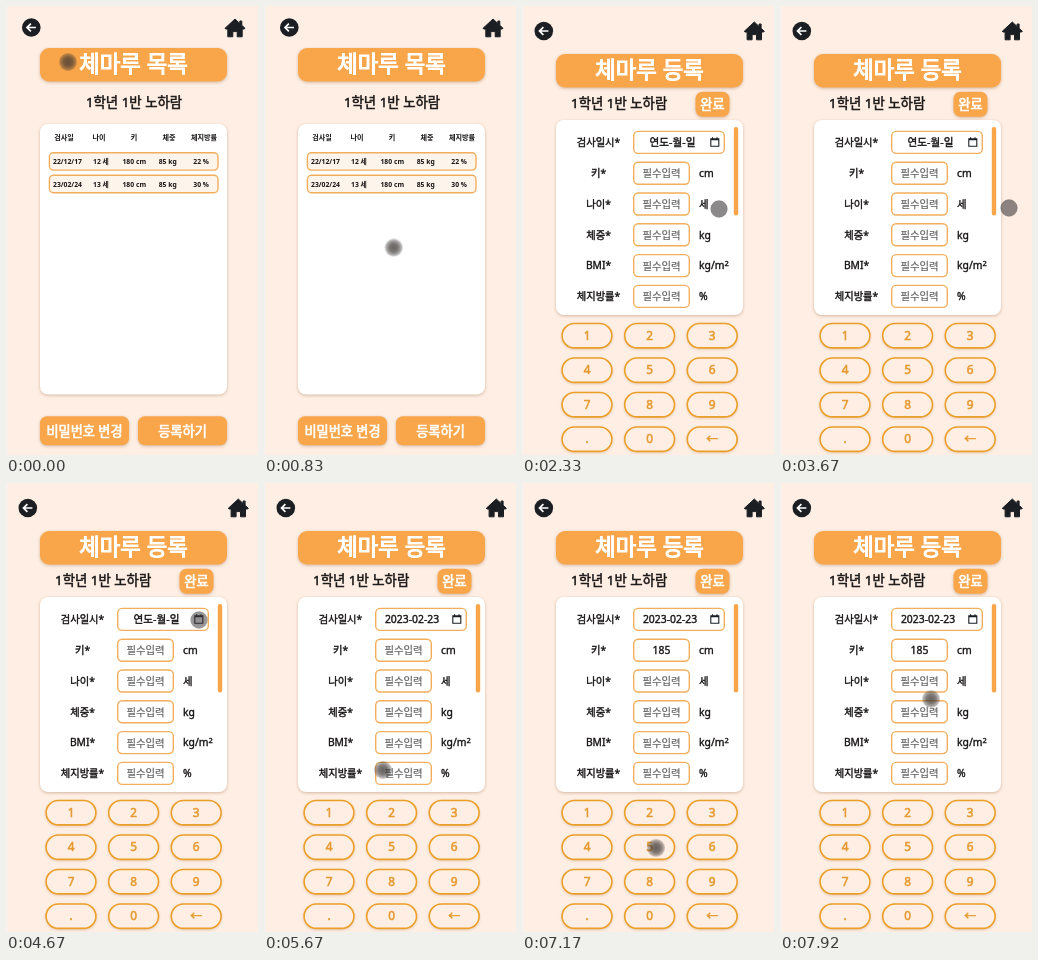
Animation, 252 px wide and 449 px high, one loop 8 s. Source, as an HTML page:

```html
<!DOCTYPE html>
<html lang="ko">
<head>
<meta charset="utf-8">
<title>체마루</title>
<style>
html, body { margin: 0; width: 100%; height: 100%; overflow: hidden; background: #feeee3; }
svg { display: block; width: 100%; height: 100%; }
/* a fine outline gives the regular weight a medium look */
text {
  font-family: "Noto Sans", "Noto Sans CJK KR", "Noto Sans CJK", sans-serif; font-weight: 400;
  color: #171414; fill: currentColor; stroke: currentColor; stroke-width: .035em; text-anchor: middle;
}
.start { text-anchor: start; }
.bold { font-weight: 700; stroke: none; }
.white { color: #fff; stroke-width: .05em; }
.hint { color: #666; stroke-width: .02em; }
.key { color: #e59a30; stroke-width: .05em; }
.panel { fill: #f9a64b; }
.card { fill: #fff; }
.raised { filter: drop-shadow(0 1.5px 1.5px #8c5a3060); }
.outline { fill: #fff; stroke: #f2ae5c; stroke-width: 1.4; }
.entry { fill: #fdf4ec; }
.pill { fill: #feeee3; stroke: #eb9f28; stroke-width: 1.6; filter: drop-shadow(0 1px 1px #8c5a3038); }

/* every state shares one 8 s clock */
.state { animation: 8s step-end infinite; }
.list { animation-name: list; }
.form { animation-name: form; }
.no-date { animation-name: no-date; }
.date { animation-name: date; }
.empty { animation-name: empty; }
.one { animation-name: one; }
.two { animation-name: two; }
.three { animation-name: three; }
@keyframes list { 0% { opacity: 1 } 24%, 100% { opacity: 0 } }
@keyframes form { 0% { opacity: 0 } 24%, 100% { opacity: 1 } }
@keyframes no-date { 0% { opacity: 1 } 62%, 100% { opacity: 0 } }
@keyframes date { 0% { opacity: 0 } 62%, 100% { opacity: 1 } }
@keyframes empty { 0% { opacity: 1 } 75%, 100% { opacity: 0 } }
@keyframes one { 0% { opacity: 0 } 75% { opacity: 1 } 81.5%, 100% { opacity: 0 } }
@keyframes two { 0% { opacity: 0 } 81.5% { opacity: 1 } 89%, 100% { opacity: 0 } }
@keyframes three { 0% { opacity: 0 } 89%, 100% { opacity: 1 } }

.pointer { animation: move 8s ease-in-out infinite; }
.flat { animation: flat 8s linear infinite; }
.press { animation: press 8s linear infinite; }
@keyframes move {
  0%, 3% { transform: translate(62px, 56px) }
  18%, 23% { transform: translate(201px, 437px) }
  29%, 32% { transform: translate(197px, 203px) }
  40%, 47% { transform: translate(229px, 202px) }
  53%, 60% { transform: translate(193px, 137px) }
  65%, 66.5% { transform: translate(140px, 168px) }
  70.9% { transform: translate(119px, 287px) }
  74%, 75.5% { transform: translate(66px, 331px) }
  80.25%, 82% { transform: translate(151px, 392px) }
  87.5%, 89.5% { transform: translate(134px, 365px) }
  97%, 100% { transform: translate(151px, 216px) }
}
@keyframes press {
  0%, 23% { opacity: 1 }
  27%, 52% { opacity: 0 }
  54%, 56% { opacity: 1 }
  58%, 64% { opacity: .2 }
  66%, 100% { opacity: 1 }
}
@keyframes flat {
  0%, 23% { opacity: 0 }
  27%, 52% { opacity: 1 }
  54%, 56% { opacity: 0 }
  58%, 64% { opacity: .8 }
  66%, 100% { opacity: 0 }
}
</style>
</head>
<body>
<svg id="stage" viewBox="0 0 252 449">
  <defs>
    <radialGradient id="dark">
      <stop offset="0" stop-color="#3a3532" stop-opacity=".78"/>
      <stop offset=".5" stop-color="#3a3532" stop-opacity=".66"/>
      <stop offset=".8" stop-color="#3a3532" stop-opacity=".42"/>
      <stop offset="1" stop-color="#3a3532" stop-opacity=".2"/>
    </radialGradient>
    <g id="back">
      <circle r="9.3" fill="#1b1f23"/>
      <path d="M4.6 0H-4M-.4-3.9L-4.3 0L-.4 3.9" fill="none" stroke="#fff" stroke-width="1.7"/>
    </g>
    <path id="home" fill="#1b1f23" stroke="#1b1f23" stroke-width="1" stroke-linejoin="round"
      d="M0-9L-10 .3L-9.4 1H-7.2V8.8H-2.2V3.6H2.2V8.8H7.2V1H9.4L10 .3L6.8-2.7V-7H4.8V-4.5Z"/>
  </defs>
</svg>
<script>
const text = (x, y, size, label, cls = "") =>
  `<text x="${x}" y="${y}" font-size="${size}" class="${cls}">${label}</text>`;
const box = (x, y, w, h, r, cls) =>
  `<rect x="${x}" y="${y}" width="${w}" height="${h}" rx="${r}" class="${cls}"/>`;
const icons = (bx, by, hx, hy) =>
  `<use href="#back" x="${bx}" y="${by}"/><use href="#home" x="${hx}" y="${hy}"/>`;
const group = (cls, body) => `<g class="state ${cls}">${body}</g>`;
const button = (x, y, w, h, label) =>
  box(x, y, w, h, 7, "panel raised") + text(x + w / 2, y + h / 2 + 4.8, 13.2, label, "white");
const heading = (y, label) =>
  box(34, y, 187, 33.5, 9, "panel raised") + text(127.5, y + 24.3, 22.3, label, "white");

const student = "1학년 1반 노하람";

function listScreen() {
  const heads = ["검사일", "나이", "키", "체중", "체지방률"];
  const rows = [
    ["22/12/17", "12 세", "180 cm", "85 kg", "22 %"],
    ["23/02/24", "13 세", "180 cm", "85 kg", "30 %"]
  ];
  return icons(25.3, 21.5, 229, 22) + heading(42, "체마루 목록") +
    text(128, 101, 13.4, student) +
    box(34, 118, 187, 270.5, 8, "card raised") +
    heads.map((h, i) => text(58 + 35 * i, 134.3, 7.1, h, "bold")).join("") +
    rows.map((row, r) => box(43.4, 146.7 + 22.6 * r, 168.6, 17.4, 4, "outline entry") +
      row.map((v, i) => text(61.5 + 33.4 * i, 158.1 + 22.5 * r, 6.8, v, "bold")).join("")).join("") +
    button(34, 410.3, 89, 29, "비밀번호 변경") + button(132, 410.3, 89, 29, "등록하기");
}

function fieldRow([label, unit], i) {
  const y = 136.3 + 30.8 * i;
  const value = (v, cls = "") => text(139.5, y + 4, 10.4, v, cls);
  let field;
  if (i === 0) {
    field = group("no-date", text(150.5, y + 4, 10.6, "연도-월-일")) +
      group("date", text(148, y + 4, 10.4, "2023-02-23")) +
      `<path d="M188.8 132.8h8v7.5h-8zM188.8 133.8h8M190.6 131.2v2M195 131.2v2" fill="none" stroke="#1b1f23" stroke-width="1.1"/>`;
  } else if (i === 1) {
    field = group("empty", value("필수입력", "hint")) + group("one", value("1")) +
      group("two", value("18")) + group("three", value("185"));
  } else {
    field = value("필수입력", "hint");
  }
  return text(76.5, y + 3.8, 10.3, label) +
    box(111.7, y - 10.9, i ? 55.6 : 90.6, 22, 4.5, "outline") + field +
    text(177, y + 3.8, 10.4, unit, "start");
}

function formScreen() {
  const fields = [["검사일시*", ""], ["키*", "cm"], ["나이*", "세"], ["체중*", "kg"],
    ["BMI*", 'kg/m<tspan dy="-3.5" font-size="7.5">2</tspan>'], ["체지방률*", "%"]];
  const keys = [..."123456789.0←"];
  return icons(21.8, 25, 232.3, 25) + heading(48, "체마루 등록") +
    text(49, 102.2, 13.4, student, "start") + button(173.5, 85.7, 34, 25, "완료") +
    box(34, 114, 187, 195, 8, "card raised") +
    box(211.8, 121, 4.4, 88.5, 2, "panel") +
    fields.map(fieldRow).join("") +
    keys.map((k, i) => {
      const x = 65 + 62.6 * (i % 3), y = 329.7 + 34.5 * Math.floor(i / 3);
      return box(x - 24.9, y - 12.2, 49.8, 24.4, 12.2, "pill") + text(x, y + 4.2, 11.8, k, "key");
    }).join("");
}

const pointer = `<g class="pointer">
  <circle r="8.4" fill="#3f3b3d" fill-opacity=".6" stroke="#555" stroke-opacity=".2" class="flat"/>
  <circle r="9" fill="url(#dark)" class="press"/></g>`;

document.getElementById("stage").insertAdjacentHTML("beforeend",
  `<rect width="252" height="449" fill="#feeee3"/><rect width="1.5" height="449" fill="#f5f2f1"/>` +
  group("list", listScreen()) + group("form", formScreen()) + pointer);
</script>
</body>
</html>
```
